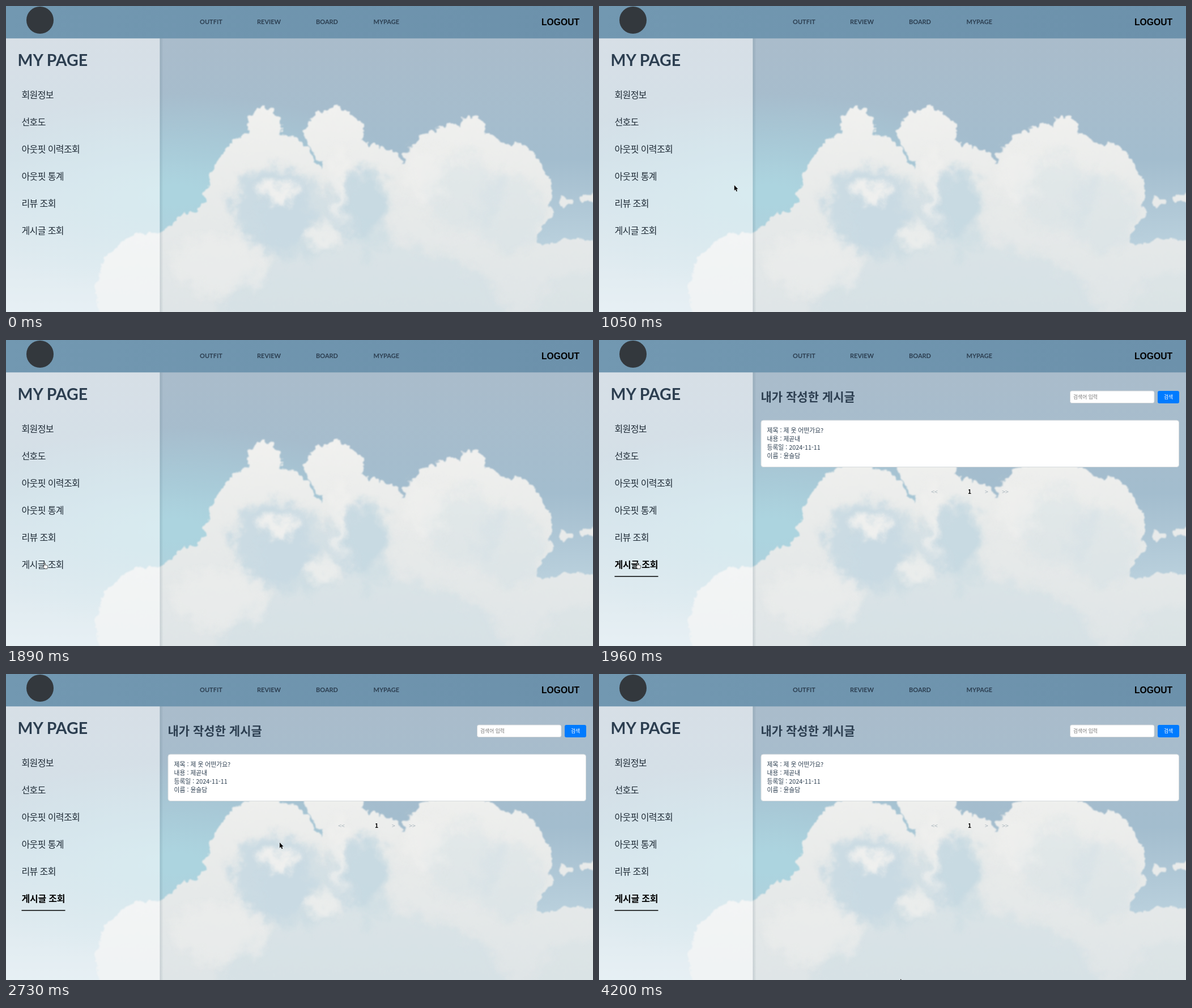
An HTML page for the animation above (4270 ms loop, 1036 by 541 pixels).

```html
<!DOCTYPE html>
<html lang="ko">
<head>
<meta charset="utf-8">
<style>
html, body { margin: 0; width: 100%; height: 100%; overflow: hidden }
svg { display: block; width: 100%; height: 100% }
text { font-family: "Noto Sans CJK KR", "Noto Sans", sans-serif; fill: #2c3e50 }
.nav { font: bold 11px Lato, sans-serif }
.title { font: bold 28.5px Lato, sans-serif }
.logout { font: bold 15.7px "Liberation Sans", sans-serif; fill: #000 }
.item { font-size: 16px; letter-spacing: -.6px; fill: #1f2b36 }
.item.active { font-weight: bold; letter-spacing: -.2px; fill: #000 }
.heading { font-size: 21px; font-weight: bold }
.card { font-size: 10.8px }
.small { font-size: 8.8px }
.pager { font-size: 10.5px; fill: #a6b3bb; text-anchor: middle }
</style>
</head>
<body>
<svg viewBox="0 0 1036 541" preserveAspectRatio="none">
  <defs>
    <linearGradient id="sky" x2="0" y2="1">
      <stop offset=".1" stop-color="#aabccb"/>
      <stop offset=".5" stop-color="#a3bdce"/>
      <stop offset="1" stop-color="#cbdfe8"/>
    </linearGradient>
    <radialGradient id="teal">
      <stop offset=".1" stop-color="#acd4df"/>
      <stop offset="1" stop-color="#acd4df" stop-opacity="0"/>
    </radialGradient>
    <linearGradient id="bar">
      <stop offset="0" stop-color="#7298b1"/>
      <stop offset="1" stop-color="#6c91ab"/>
    </linearGradient>
    <linearGradient id="vapour" gradientUnits="userSpaceOnUse" x1="0" y1="180" x2="0" y2="541">
      <stop offset="0" stop-color="#f1f1ef"/>
      <stop offset=".4" stop-color="#e9ebea"/>
      <stop offset="1" stop-color="#dfe5e7"/>
    </linearGradient>
    <linearGradient id="edge">
      <stop offset="0" stop-color="#34505f" stop-opacity=".16"/>
      <stop offset="1" stop-color="#34505f" stop-opacity="0"/>
    </linearGradient>
    <filter id="puffy" filterUnits="userSpaceOnUse" x="-60" y="0" width="1160" height="800" color-interpolation-filters="sRGB">
      <feTurbulence type="fractalNoise" baseFrequency=".055" numOctaves="3" seed="4" result="noise"/>
      <feDisplacementMap in="SourceGraphic" in2="noise" scale="20" xChannelSelector="R" yChannelSelector="G"/>
      <feGaussianBlur stdDeviation=".9"/>
    </filter>
    <filter id="soft" filterUnits="userSpaceOnUse" x="-60" y="0" width="1160" height="800" color-interpolation-filters="sRGB">
      <feGaussianBlur in="SourceGraphic" stdDeviation="8" result="blur"/>
      <feTurbulence type="fractalNoise" baseFrequency=".03" numOctaves="4" seed="9" result="noise"/>
      <feDisplacementMap in="blur" in2="noise" scale="50" xChannelSelector="R" yChannelSelector="G"/>
    </filter>
  </defs>

  <rect width="1036" height="541" fill="url(#sky)"/>
  <ellipse cx="300" cy="335" rx="430" ry="180" fill="url(#teal)"/>
  <g id="cloud" filter="url(#puffy)" fill="url(#vapour)" transform="translate(-3 -3)"></g>
  <g id="shadows" filter="url(#soft)" fill="#c6d9e2"></g>
  <g id="lights" filter="url(#soft)" fill="#f0f0ee"></g>

  <rect y="57" width="271.5" height="484" fill="#fff" opacity=".53"/>
  <rect x="271.5" y="57" width="6" height="484" fill="url(#edge)"/>
  <rect width="1036" height="57.3" fill="url(#bar)"/>
  <circle cx="60" cy="25" r="24" fill="#33383d"/>
  <g id="nav"></g>
  <text class="logout" x="945" y="34">LOGOUT</text>
  <text class="title" x="20.5" y="105.5">MY PAGE</text>
  <g id="menu"></g>

  <g id="posts">
    <path d="M27.5 418H104.5" stroke="#000" stroke-width="1.4"/>
    <text class="heading" x="285.5" y="107.5">내가 작성한 게시글</text>
    <rect x="831.5" y="90" width="148.5" height="21.5" rx="3" fill="#fff" stroke="#ccd2d6"/>
    <text class="small" x="837" y="104" style="fill:#777">검색어 입력</text>
    <rect x="986" y="90" width="38" height="22" rx="3" fill="#007bff"/>
    <text class="small" x="1005" y="104" text-anchor="middle" style="fill:#fff">검색</text>
    <rect x="286" y="142" width="737.5" height="82.5" rx="4" fill="#fff" stroke="#d5dadd"/>
    <g id="card"></g>
    <text class="pager" x="592" y="272">&lt;&lt;</text>
    <text class="pager" x="654" y="272" style="fill:#000;font-weight:bold">1</text>
    <text class="pager" x="684" y="272">&gt;</text>
    <text class="pager" x="717" y="272">&gt;&gt;</text>
  </g>

  <g id="cursor">
    <path id="arrow" d="M0 0V9.6L2.2 7.6 3.7 11.2 5.3 10.5 3.8 7.1H6.7Z" fill="#000" stroke="#fff" stroke-width=".7" paint-order="stroke"/>
    <path id="hand" d="M2 .8Q3 0 3.7 1V5Q5 4.2 5.6 5.2 6.8 4.6 7.2 5.6 8.6 5.2 8.7 6.8V8.6L7.6 11.5H3.2L.3 7.6Q.1 6.5 1.3 6.7L2 7.3Z" fill="#fff" stroke="#222" stroke-width=".8"/>
  </g>
</svg>
<script>
const $ = id => document.getElementById(id);

function add(parent, tag, attrs, text = '') {
  const el = document.createElementNS('http://www.w3.org/2000/svg', tag);
  for (const key in attrs) el.setAttribute(key, attrs[key]);
  el.textContent = text;
  return $(parent).appendChild(el);
}

let seed = 7;
const random = () => (seed = seed * 16807 % 2147483647) / 2147483647;
const ellipse = (parent, cx, cy, rx, ry, opacity = 1) => add(parent, 'ellipse', { cx, cy, rx, ry, opacity });

// A dome of cloud: small puffs along its upper rim, shadow in its lower middle
function dome(cx, cy, rx, ry, shade) {
  ellipse('cloud', cx, cy, rx, ry);
  for (let angle = Math.PI; angle < 2 * Math.PI; angle += 16 / Math.max(rx, ry)) {
    const r = 3 + random() * 6;
    ellipse('cloud', cx + Math.cos(angle) * (rx - 4), cy + Math.sin(angle) * (ry - 4), r, r);
  }
  if (shade) ellipse('shadows', cx + rx * .08, cy + ry * .25, rx * .68, ry * .72, shade);
}

dome(600, 510, 375, 205, .35);
dome(462, 333, 102, 108, .85);
dome(460, 217, 30, 33, 0);
dome(582, 232, 50, 48, 0);
dome(618, 330, 68, 90, .85);
dome(672, 292, 34, 34, 0);
dome(800, 310, 102, 94, .25);
dome(826, 223, 21, 26, 0);
dome(882, 342, 85, 96, .25);
dome(260, 512, 98, 108, 0);
dome(362, 482, 100, 98, 0);
dome(1010, 525, 130, 110, .2);
ellipse('cloud', 990, 350, 12, 9);
ellipse('cloud', 1030, 343, 17, 8);

// Strong shade between the two front towers, and the sunlit ridge and tufts
ellipse('shadows', 515, 375, 72, 75, .6);
ellipse('shadows', 645, 365, 38, 75, .5);
ellipse('lights', 484, 328, 30, 17);
ellipse('lights', 588, 315, 10, 65);
ellipse('lights', 555, 405, 34, 20, .8);
ellipse('lights', 375, 455, 85, 55, .5);
ellipse('lights', 740, 300, 35, 50, .6);

Object.entries({ OUTFIT: 342, REVIEW: 443, BOARD: 547, MYPAGE: 648.5 })
  .forEach(([label, x]) => add('nav', 'text', { class: 'nav', x, y: 32 }, label));
const items = ['회원정보', '선호도', '아웃핏 이력조회', '아웃핏 통계', '리뷰 조회', '게시글 조회']
  .map((label, i) => add('menu', 'text', { class: 'item', x: 27.5, y: 163 + i * 48 }, label));
['제목 : 제 옷 어떤가요?', '내용 : 제곧내', '등록일 : 2024-11-11', '이름 : 윤슬담']
  .forEach((line, i) => add('card', 'text', { class: 'card', x: 296.5, y: 164 + i * 15.1 }, line));

const linear = k => k;
const easeOut = k => k * (2 - k);
const easeInOut = k => k * k * (3 - 2 * k);
const moves = [
  { from: 70, to: 420, x: 629, y: 238, ease: easeOut },
  { from: 560, to: 1120, x: 183, y: 328, ease: linear },
  { from: 1120, to: 1470, x: 68, y: 379, ease: easeOut },
  { from: 1470, to: 1680, x: 65, y: 393, ease: easeOut },
  { from: 2030, to: 2730, x: 483, y: 298, ease: easeInOut },
  { from: 3430, to: 3990, x: 546, y: 487, ease: easeInOut },
  { from: 3990, to: 4200, x: 532, y: 539, ease: linear }
];

function pointerAt(t) {
  let x = 1029, y = 425;
  for (const move of moves) {
    const k = move.ease(Math.min(1, Math.max(0, (t - move.from) / (move.to - move.from))));
    x += (move.x - x) * k;
    y += (move.y - y) * k;
  }
  return [x, y];
}

const show = (id, on) => $(id).style.display = on ? '' : 'none';
const LOOP = 4270, STEP = 70;

function draw(now) {
  const t = Math.floor(now % LOOP / STEP) * STEP;
  const opened = t >= 1960, pointing = t >= 1680 && t < 2170;
  show('posts', opened);
  items[5].classList.toggle('active', opened);
  show('cursor', t >= STEP);
  show('hand', pointing);
  show('arrow', !pointing);
  $('cursor').setAttribute('transform', `translate(${pointerAt(t)})`);
  requestAnimationFrame(() => draw(performance.now() - start));
}
const start = performance.now();
draw(0);
</script>
</body>
</html>
```
